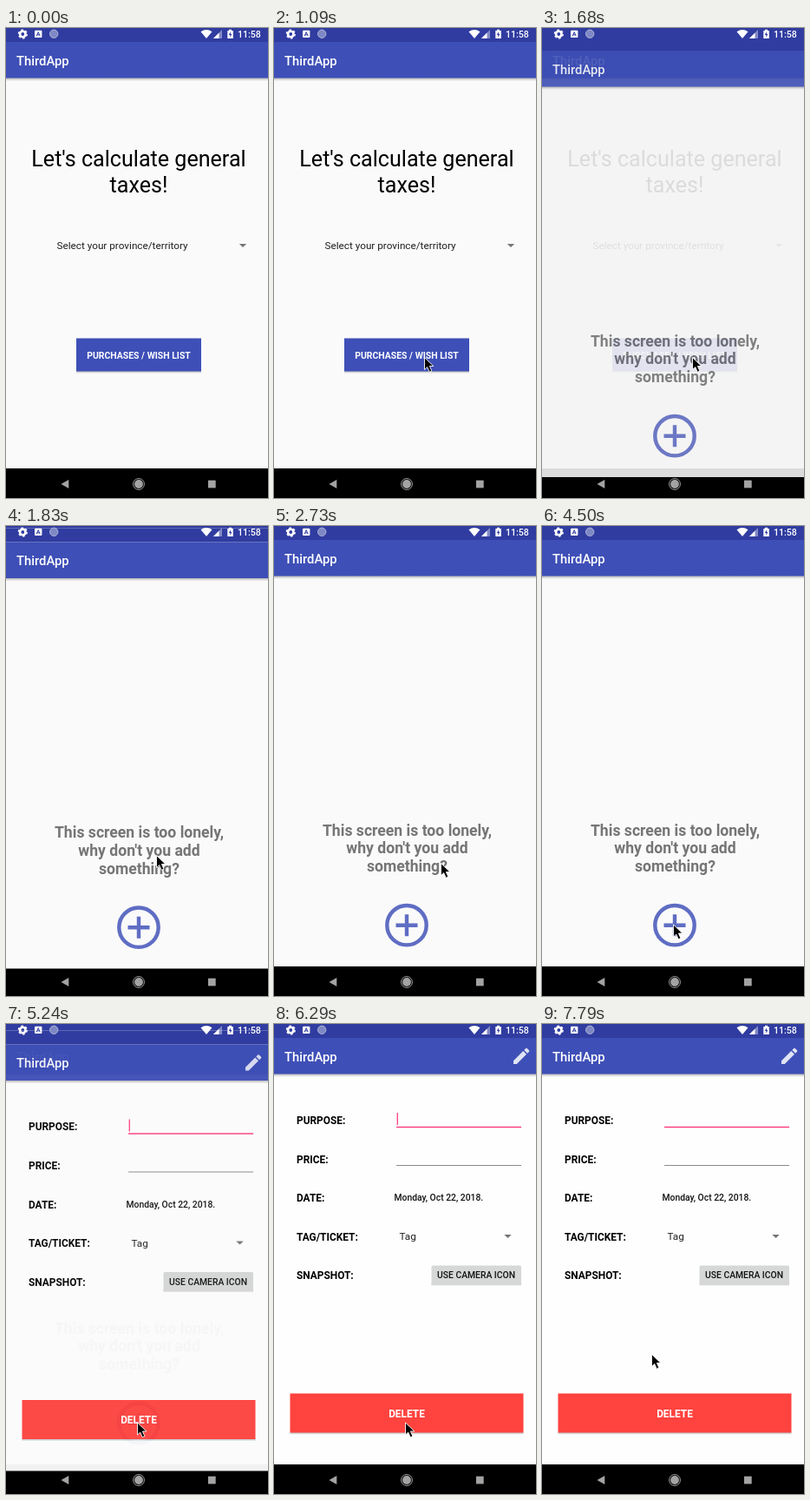
Recreate the animation shown at these times as an HTML page. Size 302 by 540 pixels, loop 8 s.

```html
<!DOCTYPE html>
<html lang="en">
<head>
<meta charset="utf-8">
<title>Tax app walkthrough</title>
<style>
html, body { margin: 0; width: 100%; height: 100%; overflow: hidden; background: #000; }
svg { display: block; width: 100vw; height: 100vh; font-family: Roboto, "Noto Sans", sans-serif; }
.mid { text-anchor: middle; }
.title { font-size: 14.8px; font-weight: 500; fill: #fff; }
.heading { font-size: 25.1px; fill: #000; }
.empty { font-size: 17.6px; font-weight: 700; fill: #757575; }
.field { font-size: 11.76px; fill: #212121; }
.label { font-size: 11.9px; font-weight: 700; fill: #000; }
.button { font-size: 10.45px; font-weight: 700; fill: #fff; }
.small { font-size: 10.35px; font-weight: 500; fill: #111; }
</style>
</head>
<body>
<svg viewBox="0 0 302 540">
  <defs>
    <linearGradient id="shade" x1="0" y1="0" x2="0" y2="1">
      <stop offset="0" stop-color="#000" stop-opacity=".3"/>
      <stop offset="1" stop-color="#000" stop-opacity="0"/>
    </linearGradient>
    <g id="bar">
      <rect width="302" height="16" fill="#303ca0"/>
      <rect y="57" width="302" height="4" fill="url(#shade)"/>
      <rect y="16" width="302" height="41.5" fill="#3e4fb7"/>
      <text class="title" x="12" y="42.5">ThirdApp</text>
    </g>
    <path id="arrow" d="M-4.2-2.1H4.2L0 2.1Z" fill="#757575"/>
  </defs>

  <rect width="302" height="540"/>

  <g id="home">
    <rect width="302" height="506" fill="#fafafa"/>
    <use href="#bar"/>
    <g class="heading mid">
      <text x="153" y="158.5">Let's calculate general</text>
      <text x="153" y="188.5">taxes!</text>
    </g>
    <text class="field" x="58.5" y="254">Select your province/territory</text>
    <use href="#arrow" x="273" y="250"/>
    <rect x="81" y="394" width="144" height="3" fill="url(#shade)"/>
    <rect x="81" y="356.5" width="144" height="38" fill="#3e4fb7"/>
    <text class="button mid" x="153" y="379.7">PURCHASES / WISH LIST</text>
  </g>

  <rect id="dim" y="16" width="302" height="490" opacity=".17"/>

  <g id="list">
    <rect width="302" height="506" fill="#fafafa"/>
    <use href="#bar"/>
    <g class="empty mid">
      <text x="153.5" y="355.5">This screen is too lonely,</text>
      <text x="153.5" y="376.2">why don't you add</text>
      <text x="153.5" y="397">something?</text>
    </g>
    <g fill="none" stroke="#5f6dc3" stroke-width="4.4">
      <circle cx="153" cy="458.7" r="22.7"/>
      <path d="M140.5 458.7H165.5M153 446.2V471.2"/>
    </g>
  </g>

  <rect id="dimList" y="16" width="302" height="490" opacity=".17"/>

  <g id="form">
    <rect width="302" height="506" fill="#fefefe"/>
    <use href="#bar"/>
    <path d="M276 46V42.2L287.2 31L291 34.8L279.8 46ZM288.3 29.9L290.2 28Q291 27.4 291.8 28L294 30.2Q294.6 31 294 31.8L292.1 33.7Z" fill="#e0e3f3"/>
    <g id="labels" class="label"></g>
    <path d="M141 118.5H285" stroke="#ff4081" stroke-width="1.5"/>
    <path d="M141 162.5H285" stroke="#8c8c8c"/>
    <path id="caret" d="M142.3 102V116" stroke="#ff4081" stroke-width="1.3"/>
    <text class="small" x="138.5" y="203">Monday, Oct 22, 2018.</text>
    <text class="field" x="144.5" y="248.3">Tag</text>
    <use href="#arrow" x="269.5" y="244"/>
    <rect x="181.5" y="298" width="103.5" height="3" fill="url(#shade)"/>
    <rect x="181.5" y="277.5" width="103.5" height="22" rx="1.5" fill="#d6d7d7"/>
    <text class="small mid" x="233" y="292.3">USE CAMERA ICON</text>
    <rect x="18.5" y="469" width="269" height="3" fill="url(#shade)"/>
    <rect x="18.5" y="424.5" width="269" height="45" fill="#ff433f"/>
    <text class="label mid" x="153" y="451.5" style="fill:#fff">DELETE</text>
  </g>

  <g id="system" fill="#fff">
    <circle cx="19.3" cy="7" r="3.2" fill="none" stroke="#fff" stroke-width="2.6"/>
    <circle cx="19.3" cy="7" r="4.9" fill="none" stroke="#fff" stroke-width="1.4" stroke-dasharray="2.6 2.53"/>
    <rect x="33" y="2.7" width="8.4" height="8.4" rx="1"/>
    <path d="M35.2 9.3L37.2 4.6L39.2 9.3M36 7.8H38.4" fill="none" stroke="#303ca0"/>
    <circle cx="55.2" cy="6.8" r="4.7" fill="#7e88c4" stroke="#b4badd" stroke-width=".9"/>
    <path d="M224.5 4.3Q231 -.2 237.5 4.3L231 12Z"/>
    <path d="M249 2V12H239Z" opacity=".4"/>
    <path d="M245.5 5.5V12H239Z"/>
    <path d="M255.3 2.9H257V1.7H260V2.9H261.8V12H255.3Z"/>
    <path d="M259 4.3L256.8 8H258.3V10.8L260.4 7H259Z" fill="#303ca0"/>
    <text x="267" y="11" font-size="10.6" font-weight="500">11:58</text>
    <g fill="#a3a3a3">
      <path d="M63.5 524L72.3 519V529Z"/>
      <circle cx="153" cy="524" r="4.9"/>
      <circle cx="153" cy="524" r="6.4" fill="none" stroke="#a3a3a3"/>
      <rect x="233" y="519.7" width="8.7" height="8.7"/>
    </g>
  </g>

  <path id="cursor" d="M.5 .5V14.6L3.7 11.6L6.2 17.3L8.9 16.1L6.4 10.5H10.9Z" stroke="#fff" stroke-width=".9"/>
</svg>
<script>
const LOOP = 8000;
const STEP = 147.5;
const $ = id => document.getElementById(id);

$("labels").innerHTML = ["PURPOSE:", "PRICE:", "DATE:", "TAG/TICKET:", "SNAPSHOT:"]
  .map((text, i) => `<text x="26" y="${114.9 + i * 44.6}">${text}</text>`).join("");

// The pointer sits on `from` at the first step and on `to` at the last.
const moves = [
  { start: 500, steps: 5, from: [270, 498], to: [173, 378] },
  { start: 2730, steps: 6, from: [192, 387], to: [251, 440] },
  { start: 3760, steps: 6, from: [236, 443], to: [151, 457.5] },
  { start: 6440, steps: 4, from: [146, 439], to: [126, 379] }
];

// Each window slides up and fades in over the one before.
const entries = [
  { id: "list", dim: "dim", poses: [[1680, 10, .88], [1830, 2.5, 1], [1980, 0, 1]] },
  { id: "form", dim: "dimList", poses: [[5240, 7.5, .95], [5390, 0, 1]] }
];

const caretTimes = [5690, 6290, 6740, 7190, 7790];

const show = (node, visible) => node.setAttribute("visibility", visible ? "visible" : "hidden");

function drawCursor(t) {
  const move = moves.filter(m => m.start <= t).pop();
  show($("cursor"), move);
  if (!move) return;
  const last = move.steps - 1;
  const part = Math.min(last, Math.floor((t - move.start) / STEP + .02)) / last;
  const [x, y] = move.from.map((a, i) => a + (move.to[i] - a) * part);
  $("cursor").setAttribute("transform", `translate(${x} ${y})`);
}

function drawEntry({ id, dim, poses }, t) {
  const pose = poses.filter(p => p[0] <= t).pop();
  show($(id), pose);
  show($(dim), pose);
  if (!pose) return;
  $(id).setAttribute("transform", `translate(0 ${pose[1]})`);
  $(id).setAttribute("opacity", pose[2]);
}

function draw(t) {
  entries.forEach(entry => drawEntry(entry, t));
  const blinks = caretTimes.filter(time => time <= t).length;
  $("caret").setAttribute("opacity", blinks % 2 ? 0 : 1);
  drawCursor(t);
}

const origin = performance.now();
function tick() {
  draw((performance.now() - origin) % LOOP);
  requestAnimationFrame(tick);
}
tick();
</script>
</body>
</html>
```
